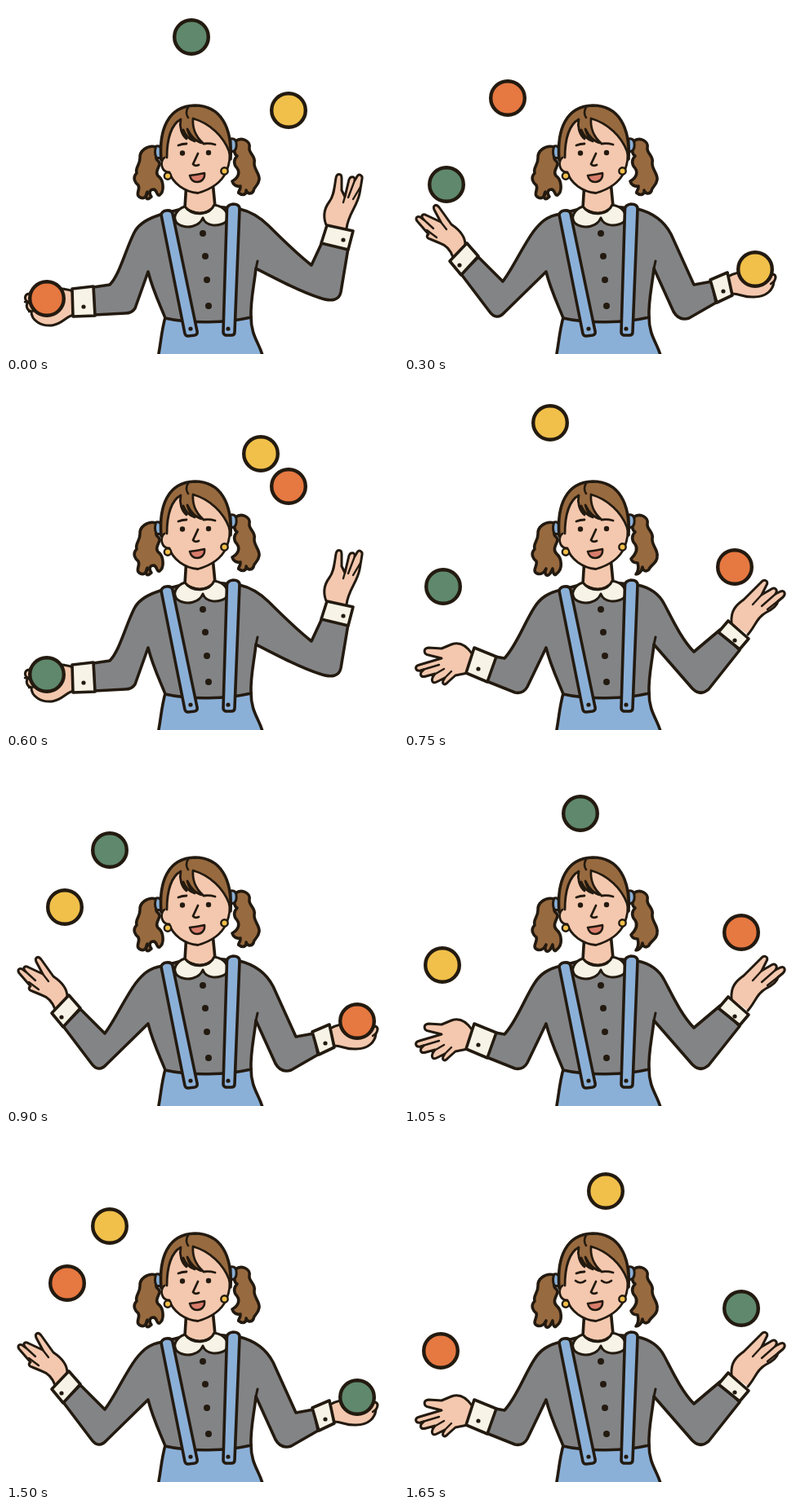
Recreate the animation shown at these times as an HTML page with a canvas. Size 480 by 427 pixels, loop 1800 ms.

```html
<!DOCTYPE html>
<html lang="en">
<head>
<meta charset="utf-8">
<title>Juggler</title>
<style>
html, body { margin: 0; width: 100%; height: 100%; overflow: hidden; background: #fff; }
canvas { display: block; width: 480px; height: 427px; }
</style>
</head>
<body>
<canvas id="stage" width="480" height="427"></canvas>
<script>
const ctx = document.getElementById('stage').getContext('2d');
const STEP = 150, STEPS = 12;
const INK = '#231a10', SKIN = '#f4c8ae', HAIR = '#986a3f', SHIRT = '#838486',
  BLUE = '#8bb0d8', CREAM = '#f7f3e6', GOLD = '#f1c04a', CORAL = '#e67841',
  GREEN = '#5f886c', LIP = '#d97d6c';

// Each arm: sleeve outline from shoulder to underarm (left) or back (right), cuff, hand, creases.
const LEFT = {
  low: {
    sleeve: 'L192 255 C176 260 163 266 157 278 C146 300 139 330 127 342 L107 345 L108 379 L146 377 Q154 377 158 371 L174 326',
    cuff: 'M81 347 L107 344 L109 380 L82 381 Z', button: [95, 369],
    hand: 'M82 350 C70 345 32 344 29 353 C22 353 22 361 27 363 C23 369 27 374 31 375 C31 386 43 393 56 392 C70 390 74 380 83 379',
    crease: 'M23 363 L31 365 M28 375 L35 374'
  },
  open: {
    sleeve: 'L192 255 C176 259 167 265 160 276 C147 296 138 323 123 339 L112 337 L101 367 L136 381 Q146 383 151 374 L174 326',
    cuff: 'M86 326 L113 337 L102 368 L76 357 Z', button: [91, 352],
    hand: 'M83 333 C76 323 68 318 58 322 L46 327 L30 326 C23 327 24 334 30 335 L46 339 L19 347 C12 349 14 355 20 354 L24 353 C18 358 20 363 27 361 L38 358 C32 365 34 371 40 368 L50 363 C45 370 49 374 54 368 L63 360 L78 357',
    crease: 'M23 353 L43 347 M37 359 L49 352 M49 364 L58 355'
  },
  high: {
    sleeve: 'L192 255 C174 258 167 266 159 276 C145 295 134 321 121 338 L91 308 L70 329 L104 374 Q113 387 123 376 L174 326',
    cuff: 'M56 313 L77 291 L91 307 L70 330 Z', button: [68, 318],
    hand: 'M75 293 C75 282 67 274 58 268 L43 247 C39 242 35 245 37 250 L45 265 L28 257 C22 254 20 258 24 262 L20 259 C14 257 14 262 17 265 L30 280 C27 282 28 285 32 286 L44 291 C53 294 57 300 60 308',
    crease: 'M24 262 L36 273 M28 275 L40 284 M45 265 L52 274'
  }
};
const RIGHT = {
  low: {
    sleeve: 'L330 375 Q337 387 349 383 L382 364 L377 338 L355 342 L327 280 C317 261 302 253 286 249',
    cuff: 'M375 336 L396 327 L402 355 L383 364 Z', button: [391, 350],
    hand: 'M397 332 C409 324 440 323 448 331 C454 326 457 332 453 338 C452 349 443 357 429 357 C416 358 412 353 402 353',
    crease: 'M449 341 L454 337'
  },
  open: {
    sleeve: 'L353 376 Q363 386 373 377 L411 329 L387 304 L355 331 C340 316 328 290 319 273 C312 259 300 252 286 249',
    cuff: 'M397 293 L422 315 L411 328 L385 307 Z', button: [405, 317],
    hand: 'M401 295 C400 281 406 274 416 267 L437 246 C441 241 447 244 444 249 L438 261 L450 254 C455 251 458 256 455 260 L461 257 C466 255 468 260 464 264 L458 269 C457 274 451 279 443 283 C432 289 430 300 421 310',
    crease: 'M438 261 L427 273 M455 260 L438 275 M464 264 L445 279'
  },
  high: {
    sleeve: 'C335 337 362 351 384 358 Q407 366 410 351 L419 297 L387 290 L374 318 C355 303 338 286 322 270 C311 259 299 252 286 249',
    cuff: 'M393 269 L425 276 L419 299 L386 291 Z', button: [413, 287],
    hand: 'M393 271 C387 258 390 248 396 240 C402 232 402 222 404 211 C405 205 411 205 411 211 L411 226 L415 234 L420 213 C422 208 428 209 427 214 L430 209 C432 205 437 208 436 212 L433 230 C430 246 419 255 417 273',
    crease: 'M411 226 L415 234 L413 241 M427 214 L419 235 M434 222 L425 237'
  }
};

// One position per step for every ball.
const BALLS = [
  [GREEN, [[227, 38], [115, 90], [52, 219], [35, 293], [50, 359], [48, 251],
    [127, 113], [216, 68], [338, 128], [402, 222], [430, 323], [413, 214]]],
  [GOLD, [[346, 128], [404, 225], [430, 323], [410, 201], [312, 88], [179, 50],
    [72, 183], [47, 254], [50, 359], [48, 249], [127, 113], [247, 70]]],
  [CORAL, [[50, 359], [47, 250], [127, 113], [241, 69], [346, 128], [405, 227],
    [430, 323], [413, 214], [295, 59], [186, 48], [75, 183], [45, 266]]]
];

function shape(d, fill, width = 3.6) {
  const path = new Path2D(d);
  if (fill) { ctx.fillStyle = fill; ctx.fill(path); }
  ctx.lineWidth = width;
  ctx.stroke(path);
}

function disc(x, y, r, fill, width = 0) {
  ctx.beginPath();
  ctx.arc(x, y, r, 0, Math.PI * 2);
  ctx.fillStyle = fill;
  ctx.fill();
  if (width) { ctx.lineWidth = width; ctx.stroke(); }
}

function drawHand(arm) {
  shape(arm.hand, SKIN, 3);
  shape(arm.crease, null, 2.4);
  shape(arm.cuff, CREAM);
  disc(...arm.button, 2.6, INK);
}

function drawBody(left, right) {
  shape('M195 382 C190 400 190 412 186 432 L315 432 C311 414 300 406 300 381 Z', BLUE);
  shape('M221 215 L219 248 Q239 262 256 246 L253 215 Z', SKIN);
  shape(`M219 248 ${left.sleeve} C180 350 191 372 195 383 C225 390 270 389 300 382
    C299 362 304 342 306 322 ${right.sleeve} L256 246 Q239 262 219 248 Z`, SHIRT);
  shape('M306 322 L308 313', null, 3);
  shape('M219 246 C208 250 203 260 210 267 C222 275 237 270 241 260 C245 271 260 271 269 265 C275 256 268 246 255 244 C249 257 229 259 219 246 Z', CREAM, 3);
  for (const [x, y] of [[241, 279], [244, 307], [246, 336], [248, 368]]) disc(x, y, 4, INK);
  shape('M190 256 Q191 252 196 251 Q203 250 204 255 L234 399 Q235 403 231 404 L223 405 Q220 405 219 402 Z', BLUE);
  shape('M270.5 249 Q271 244 278 243 Q286 243 286 249 L280 400 Q280 404 276 404 L269 404 Q266 403 266 400 Z', BLUE);
  disc(226, 396, 2.6, INK);
  disc(272, 396, 2.6, INK);
}

function drawPigtails(hanging) {
  const leftTips = hanging
    ? 'C164 225 156 232 163 235 C168 237 172 233 174 229 C171 236 175 240 179 235 L182 229 C182 235 185 239 187 235 C195 229 193 216 187 211'
    : 'C165 226 158 230 163 234 C168 238 173 234 173 228 C169 236 173 239 178 234 C174 228 177 225 181 225 C186 227 184 233 188 232 C194 228 193 215 188 210';
  const rightTips = hanging
    ? 'C311 222 301 225 300 230 C296 234 292 231 292 227 C291 233 287 236 284 236 C288 230 287 226 286 222 C282 222 279 220 278 217'
    : 'C309 221 303 222 303 227 C300 232 295 230 294 226 C295 231 290 233 286 230 C282 229 288 226 287 221 C282 222 278 219 277 215';
  shape(`M184 173 C173 170 163 178 164 187 C164 195 158 198 160 205 C154 211 159 218 162 220 ${leftTips}
    C181 205 187 199 188 194 C188 189 183 190 184 185 Z`, HAIR);
  shape(`M281 166 C289 160 300 166 298 174 C297 181 306 184 304 192 C303 200 311 206 310 213 ${rightTips}
    C284 211 287 205 283 199 C278 194 279 188 283 184 C278 180 280 176 281 175 Z`, HAIR);
}

function drawHead(blink) {
  shape('M184 172 Q189 171 190 176 L190 187 L184 186 Q181 179 184 172 Z', BLUE, 3);
  shape('M275 163 Q281 162 282 168 Q283 175 279 178 L275 179 Z', BLUE, 3);
  shape('M190 189 C187 152 198 123 231 122 C263 122 277 149 275 188 Z', HAIR);
  shape(`M194 186 C188 191 190 204 200 204 C204 217 218 228 235 229.5 C251 225 264 216 270 203
    C274 192 275 184 273 178 C266 160 250 144 229 138 C228 150 233 161 241 168
    C233 167 227 161 222 151 C224 158 227 163 231 166 C224 164 220 159 217 152 L221 163
    C215 158 212 148 214 139 C203 145 197 162 197 186`, SKIN, 2.8);
  shape('M223 124 Q219 131 223 137', null, 2.6);
  shape('M211 171 Q216 169 221 169 M242 169 Q249 168 256 170', null, 2.8);
  if (blink) {
    shape('M210 180 Q216 185 222 180 M242 180 Q248 185 254 180', null, 2.6);
  } else {
    disc(216, 180.5, 3.2, INK);
    disc(248, 180, 3.2, INK);
  }
  shape('M235 181 L229 194 Q231 197 236 195', null, 2.8);
  shape('M225 208 Q234 207 243 205 C244 212 239 216 234 216 C229 216 226 212 225 208 Z', LIP, 2.6);
  disc(198, 208.5, 4.2, GOLD, 2.4);
  disc(267.5, 202.5, 4.2, GOLD, 2.4);
}

function draw(step) {
  const swing = step % 4;
  const left = LEFT[['low', 'open', 'high', 'open'][swing]];
  const right = RIGHT[['high', 'open', 'low', 'open'][swing]];
  ctx.fillStyle = '#fff';
  ctx.fillRect(0, 0, 480, 427);
  ctx.strokeStyle = INK;
  ctx.lineCap = ctx.lineJoin = 'round';
  drawBody(left, right);
  drawHand(left);
  drawHand(right);
  drawPigtails(step % 2 === 1);
  drawHead(step === STEPS - 1);
  for (const [color, path] of BALLS) disc(...path[step], 20.8, color, 4.4);
}

function tick(now) {
  draw(Math.floor(now / STEP) % STEPS);
  requestAnimationFrame(tick);
}
draw(0);
requestAnimationFrame(tick);
</script>
</body>
</html>
```
